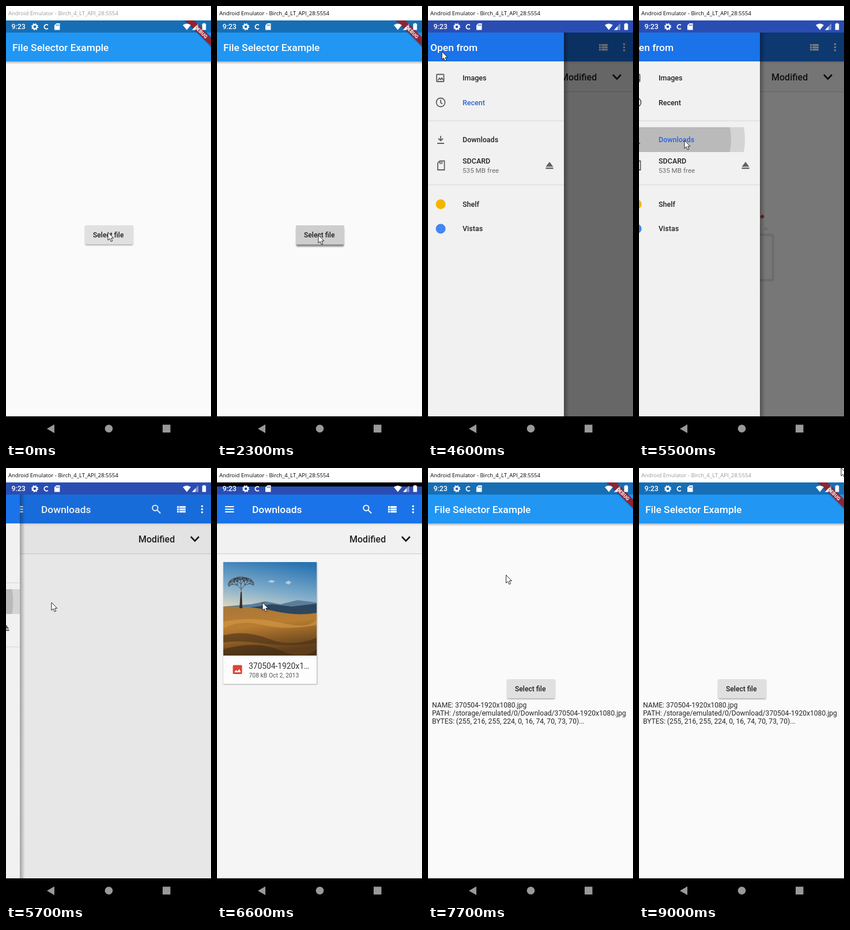
An HTML page for the animation above (9100 ms loop, 356 px wide and 752 px high).

```html
<!DOCTYPE html>
<html lang="en">
<head>
<meta charset="utf-8">
<title>File selector</title>
<style>
  html, body { margin: 0; width: 100%; height: 100%; overflow: hidden; background: #000; }
  svg { display: block; width: 356px; height: 752px; font-family: Roboto, sans-serif; }
  text { white-space: pre; }
  .med { font-weight: 500; }
  .bar { font-size: 17.4px; font-weight: 500; fill: #fff; }
  .item { font-size: 12.5px; font-weight: 500; fill: #212121; }
  .body { font-size: 12.12px; fill: #262626; }
  .line { fill: none; stroke-linecap: butt; }
</style>
</head>
<body>
<svg viewBox="0 0 356 752" xmlns="http://www.w3.org/2000/svg">
  <defs>
    <linearGradient id="fade" x2="0" y2="1">
      <stop offset="0" stop-opacity=".28"/><stop offset="1" stop-opacity="0"/>
    </linearGradient>
    <linearGradient id="side">
      <stop offset="0" stop-opacity=".3"/><stop offset="1" stop-opacity="0"/>
    </linearGradient>
    <linearGradient id="sky" x1=".75" x2=".45" y2="1">
      <stop offset="0" stop-color="#2873b2"/><stop offset=".6" stop-color="#83aecb"/><stop offset="1" stop-color="#dcd8c4"/>
    </linearGradient>
    <linearGradient id="grass" x2=".25" y2="1">
      <stop offset="0" stop-color="#a8773a"/><stop offset=".45" stop-color="#b97d31"/><stop offset="1" stop-color="#5d3d1a"/>
    </linearGradient>
    <filter id="soft" x="-20%" y="-40%" width="140%" height="200%"><feGaussianBlur stdDeviation="1.3"/></filter>
    <clipPath id="reveal"><rect id="revealBox" width="356" y="25" height="727"/></clipPath>
    <clipPath id="btnClip"><rect x="137" y="380" width="84" height="33" rx="1.8"/></clipPath>
    <clipPath id="rowClip"><rect y="210" width="246" height="43"/></clipPath>
    <clipPath id="photoClip"><rect x="11" y="163" width="162" height="162"/></clipPath>
  </defs>

  <rect width="356" height="752"/>

  <g id="app">
    <rect y="46" width="356" height="665" fill="#fafafa"/>
    <rect y="96" width="356" height="5" fill="url(#fade)"/>
    <rect y="25" width="356" height="21" fill="#186eb4"/>
    <rect y="46" width="356" height="50" fill="#2196f3"/>
    <text class="bar" x="11" y="77.5">File Selector Example</text>
    <g id="button">
      <rect id="shade" x="137.5" y="381.5" width="83" height="33" rx="2" opacity=".35" filter="url(#soft)"/>
      <rect id="face" x="137" y="380" width="84" height="33" rx="1.8" fill="#e0e0e0"/>
      <circle id="splash" cx="176" cy="397" r="0" opacity=".06" clip-path="url(#btnClip)"/>
      <text class="body med" x="151" y="401" style="fill:#1f1f1f">Select file</text>
    </g>
    <g id="result" class="body">
      <text x="7" y="415">NAME: 370504-1920x1080.jpg</text>
      <text x="7" y="429.2">PATH: /storage/emulated/0/Download/370504-1920x1080.jpg</text>
      <text x="7" y="443.4">BYTES: (255, 216, 255, 224, 0, 16, 74, 70, 73, 70)...</text>
    </g>
    <g transform="translate(356 25) rotate(45)">
      <rect x="-50" y="21" width="100" height="11" opacity=".4" filter="url(#soft)"/>
      <rect x="-50" y="21" width="100" height="10.4" fill="#8e2436"/>
      <text x="2" y="29.4" text-anchor="middle" font-size="8.6" font-weight="900" fill="#f3e6e8">DEBUG</text>
    </g>
    <rect id="dim" y="20" width="356" height="691" opacity="0"/>
  </g>

  <g fill="#999">
    <path d="M84 725V740L71 732.5Z"/><circle cx="178.500" cy="732.300" r="6.800"/><rect x="272" y="725.500" width="13.500" height="13.500"/>
  </g>

  <g id="picker" clip-path="url(#reveal)">
    <g id="sheet">
      <rect y="25" width="356" height="686" fill="#f5f5f5"/>
      <rect y="96" width="356" height="52" fill="#f1f1f1"/>
      <rect y="96" width="356" height="4" fill="url(#fade)" opacity=".45"/>
      <rect y="148" width="356" height="1.200" fill="#d3d3d3"/>
      <text class="med" x="230" y="128.500" font-size="16" fill="#212121">Modified</text>
      <path class="line" d="M321 119L328 126.300 335 119" stroke="#111" stroke-width="2.600"/>

      <rect y="46" width="356" height="50" fill="#1a73e8"/>
      <path class="line" d="M14 67H29.500M14 71.500H29.500M14 76H29.500" stroke="#fff" stroke-width="1.800"/>
      <text id="place" class="bar" x="61" y="77.800">Recent</text>
      <g fill="#fff">
        <path d="M297 66H300.300V69.300H297ZM297 70.200H300.300V73.300H297ZM297 74.200H300.300V77.300H297ZM301.200 66H312V69.300H301.200ZM301.200 70.200H312V73.300H301.200ZM301.200 74.200H312V77.300H301.200Z"/>
        <circle cx="340.500" cy="66.300" r="1.800"/><circle cx="340.500" cy="71.500" r="1.800"/><circle cx="340.500" cy="76.700" r="1.800"/>
      </g>
      <g id="search" class="line" stroke="#fff" stroke-width="1.900">
        <circle cx="259" cy="69.300" r="4.700"/><path d="M262.500 72.800L268.200 78.500"/>
      </g>

      <g id="empty">
        <rect x="125" y="396.500" width="107.500" height="78.500" rx="2.500" fill="#f5f5f5" stroke="#dadce0" stroke-width="4"/>
        <path d="M168.500 411.500H189" stroke="#dadce0" stroke-width="4.500" stroke-linecap="round"/>
        <g id="rays"></g>
        <text x="178.500" y="557" text-anchor="middle" font-size="14" fill="#252525">No items</text>
      </g>

      <g id="card">
        <rect x="11" y="164" width="163" height="211" opacity=".3" filter="url(#soft)"/>
        <rect x="11" y="163" width="162" height="211" fill="#fdfdfd"/>
        <g clip-path="url(#photoClip)">
          <rect x="11" y="163" width="162" height="90" fill="url(#sky)"/>
          <path d="M88 197l6-3 7 2-5 3zM118 199l6-4 5 3-4 4z" fill="#d5e2ea" opacity=".7"/>
          <path d="M11 240L60 236 84 231 110 236 140 229 173 233V262H11Z" fill="#5a7d9b"/>
          <path d="M50 243L95 236 130 240 173 235V262H50Z" fill="#2c4660"/>
          <path d="M11 240Q60 239 100 248T173 251V325H11Z" fill="url(#grass)"/>
          <path d="M11 266Q60 256 110 268T173 262V272Q120 282 80 272T11 278Z" fill="#d59a45" opacity=".6"/>
          <path d="M11 290Q50 280 90 296T173 294V304Q120 310 80 304T11 302Z" fill="#4b3116" opacity=".6"/>
          <path d="M11 314Q70 298 110 316T173 314V325H11Z" fill="#3f2a14" opacity=".6"/>
          <path id="tree" class="line" stroke="#352b29"/>
          <path d="M39 243L41 215H43L44 243Z" fill="#352b29"/>
        </g>
        <g transform="translate(27.500 341.500)">
          <rect width="16" height="15.500" rx="1.800" fill="#db4437"/><path d="M2.500 12.500L5.700 8.300 8 11 11 6.800 14 12.500Z" fill="#fff"/>
        </g>
        <text x="55" y="348.300" font-size="13.800" fill="#333">370504-1920x1…</text>
        <text x="55.500" y="363.200" font-size="10.400" fill="#555">708 kB Oct 2, 2013</text>
      </g>

      <rect id="scrim" y="46" width="356" height="665" opacity="0"/>
      <g id="drawer">
        <rect x="246" y="46" width="9" height="665" fill="url(#side)"/>
        <rect y="46" width="246" height="665" fill="#f1f1f1"/>
        <rect y="46" width="246" height="50" fill="#1a73e8"/>
        <text class="bar" x="14" y="77.800">Open from</text>
        <path d="M0 199H246M0 310H246" stroke="#d4d4d4" stroke-width="1.200"/>
        <g clip-path="url(#rowClip)">
          <circle class="wave" cx="100" cy="231" opacity=".12"/><circle class="wave" cx="100" cy="231" opacity=".12"/>
        </g>
        <g id="items"></g>
        <text x="70" y="289" font-size="11.700" fill="#6b6b6b">535 MB free</text>
        <path d="M221 270L227.500 278.500H214.500ZM214.500 280H227.500V282.300H214.500Z" fill="#616161"/>
        <g fill="none" stroke="#616161" stroke-width="1.800">
          <rect x="25" y="118.500" width="12.500" height="12.500" rx="1"/><path d="M27 129L30 125 32 127.500 34 124.500 37 129"/>
          <circle cx="32" cy="167" r="7.500"/><path d="M32 162.500V167.500L35 169.500"/>
          <path id="arrow" d="M32 225V233M28 229.500L32 233.500 36 229.500M26 238H38"/>
          <path d="M27 272L30.500 268.500H38.500V284H27ZM31 270V274M34 270V274"/>
        </g>
        <circle cx="32" cy="343.500" r="8.500" fill="#f4b400"/><circle cx="32" cy="386" r="8.500" fill="#4285f4"/>
      </g>
      <rect y="25" width="356" height="21" fill="#2a4db2"/>
    </g>
  </g>

  <g fill="#fff">
    <text class="med" x="9.500" y="40.300" font-size="12.400">9:23</text>
    <g fill="none" stroke="#fff">
      <circle cx="50" cy="36" r="3.600" stroke-width="2.500"/>
      <circle cx="50" cy="36" r="5.200" stroke-width="1.800" stroke-dasharray="2.042"/>
      <path d="M72.800 33.200A3.800 3.800 0 1 0 72.800 38.800" stroke-width="1.900"/>
    </g>
    <path d="M87.500 30H93.500V41.500H84V33.500ZM87 32V34.500H88V32ZM89 32V34.500H90V32ZM91 32V34.500H92V32Z" fill-rule="evenodd"/>
    <path d="M307 33Q314 27.800 321 33L314 41.500Z"/>
    <path d="M334 30V41.500H323Z" opacity=".4"/><path d="M329 35.200V41.500H323Z"/>
    <path d="M342.500 30.800V29.800H345.500V30.800H347.300V41.500H340.700V30.800Z"/>
  </g>

  <rect width="356" height="25" fill="#fff"/>
  <text id="caption" x="4" y="16.200" font-size="9.500" style="font-family:'Open Sans',sans-serif">Android Emulator - Birch_4_LT_API_28:5554</text>
  <path id="cursor" d="M0 0V13.800L3.200 10.900 5.300 16 7.800 15 5.700 10.100H9.800Z" fill="#fff" stroke="#111" stroke-width=".9"/>
</svg>
<script>
const LOOP = 9100, STEP = 100;
const $ = id => document.getElementById(id);
const set = (id, attrs) => { for (const k in attrs) $(id).setAttribute(k, attrs[k]); };
const show = (id, on) => set(id, { display: on ? 'inline' : 'none' });
const smooth = p => p * p * (3 - 2 * p);

// Interpolates rows of [time, ...values].
function at(rows, t, ease = p => p) {
  const i = rows.findIndex(r => r[0] > t);
  if (i === 0) return rows[0].slice(1);
  if (i < 0) return rows[rows.length - 1].slice(1);
  const a = rows[i - 1], b = rows[i], p = ease((t - a[0]) / (b[0] - a[0]));
  return a.slice(1).map((v, k) => v + (b[k + 1] - v) * p);
}

const pointer = [
  [0, 177, 392], [900, 177, 392], [1000, 180, 393], [1200, 176, 396], [1900, 176, 396],
  [2000, 176, 397], [3200, 176, 397], [3600, 182, 371], [4200, 21, 70], [4500, 21, 70],
  [5200, 79, 233], [7400, 79, 233], [8400, 341, 13], [8700, 351, 0]
];
// time, sheet offset, top of the visible part, app offset, dim
const swap = [
  [2700, 30, 690, -1, .02], [2800, 16, 330, -8, .06], [2900, 6, 110, -12, .09], [3000, 1, 40, -14, .1],
  [3100, 0, 25, -14, .1], [6500, 0, 25, -14, .1], [6600, 0, 32, -14, .1], [6700, 9, 330, -10, .09],
  [6800, 20, 691, -5, .08], [6900, 28, 739, -1.500, .03], [7000, 30, 752, 0, 0]
];
const slide = [
  [4300, -256], [4400, -150], [4500, -55], [4600, -10], [4700, 0],
  [5400, 0], [5500, -36], [5600, -140], [5700, -222], [5800, -256]
];
const ripple = [[5200, 0], [5300, .35], [5400, .75], [5500, 1], [5700, 1.400]];

$('rays').innerHTML = [
  [178.500, 344, 0, 1], [143, 365, -60, 1], [214, 365, 60, 1],
  [157.500, 350, -30], [199.500, 350, 30], [138, 386, -85], [220, 386, 85]
].map(([x, y, a, red]) =>
  `<rect x="-2.500" y="-3" width="5" height="6" rx="${red ? 0 : 1.500}" fill="${red ? '#ea4335' : '#dadce0'}" transform="translate(${x} ${y}) rotate(${a})"/>`
).join('');

$('items').innerHTML = [
  ['Images', 129], ['Recent', 171.500], ['Downloads', 236], ['SDCARD', 273], ['Shelf', 347.500], ['Vistas', 390]
].map(([name, y]) => `<text class="item" x="70" y="${y}">${name}</text>`).join('');

function branch(x, y, angle, len, depth) {
  const x2 = x + Math.cos(angle) * len, y2 = y + Math.sin(angle) * len * .8;
  let d = `M${x.toFixed(1)} ${y.toFixed(1)}L${x2.toFixed(1)} ${y2.toFixed(1)}`;
  if (depth) for (const turn of [-.65, -.05, .6]) d += branch(x2, y2, angle + turn, len * .72, depth - 1);
  return d;
}
set('tree', { d: branch(42, 222, -1.570, 15, 4), 'stroke-width': .7 });

const [recent, downloads] = [$('items').children[1], $('items').children[2]];
const waves = document.querySelectorAll('.wave');

function draw(t) {
  const [px, py] = at(pointer, t, smooth);
  set('cursor', { transform: `translate(${px} ${py})` });
  set('caption', { fill: t >= 2000 && t < 9000 ? '#000' : '#999' });

  const open = t >= 2700 && t < 7000;
  const [drop, top, lift, dim] = at(swap, t);
  show('app', t < 3100 || t > 6600);
  show('picker', open);
  set('app', { transform: `translate(0 ${open ? lift : 0})` });
  set('dim', { opacity: open ? dim : 0 });
  set('sheet', { transform: `translate(0 ${drop})` });
  set('revealBox', { y: top, height: Math.max(0, 752 - top) });

  const pressed = t >= 2300 && t < 3100, done = t >= 7000;
  set('face', { fill: pressed ? '#cecece' : '#e0e0e0' });
  set('shade', { y: pressed ? 384 : 381.500, opacity: pressed ? .42 : .35 });
  set('splash', { r: pressed ? Math.min(65, 5 + (t - 2300) * .300) : 0 });
  set('button', { transform: `translate(0 ${done ? -14 : 0})` });
  show('result', done);

  const chosen = t >= 5300, moved = t >= 5700;
  $('place').textContent = moved ? 'Downloads' : 'Recent';
  show('search', moved);
  show('empty', t >= 3200 && !moved);
  show('card', t >= 5900);

  const [x] = at(slide, t);
  set('drawer', { transform: `translate(${x} 0)` });
  set('scrim', { opacity: Math.max(0, .6 * (246 + x) / 246) });
  recent.style.fill = chosen ? '#212121' : '#2b63db';
  downloads.style.fill = chosen ? '#2b63db' : '#212121';
  set('arrow', { stroke: chosen ? '#2b63db' : '#616161' });
  const [grow] = at(ripple, t);
  waves.forEach((w, i) => w.setAttribute('r', grow * (i ? 96 : 120)));
}

const start = performance.now();
function tick() {
  const t = (performance.now() - start) % LOOP;
  draw(Math.floor(t / STEP) * STEP);
  requestAnimationFrame(tick);
}
tick();
</script>
</body>
</html>
```
